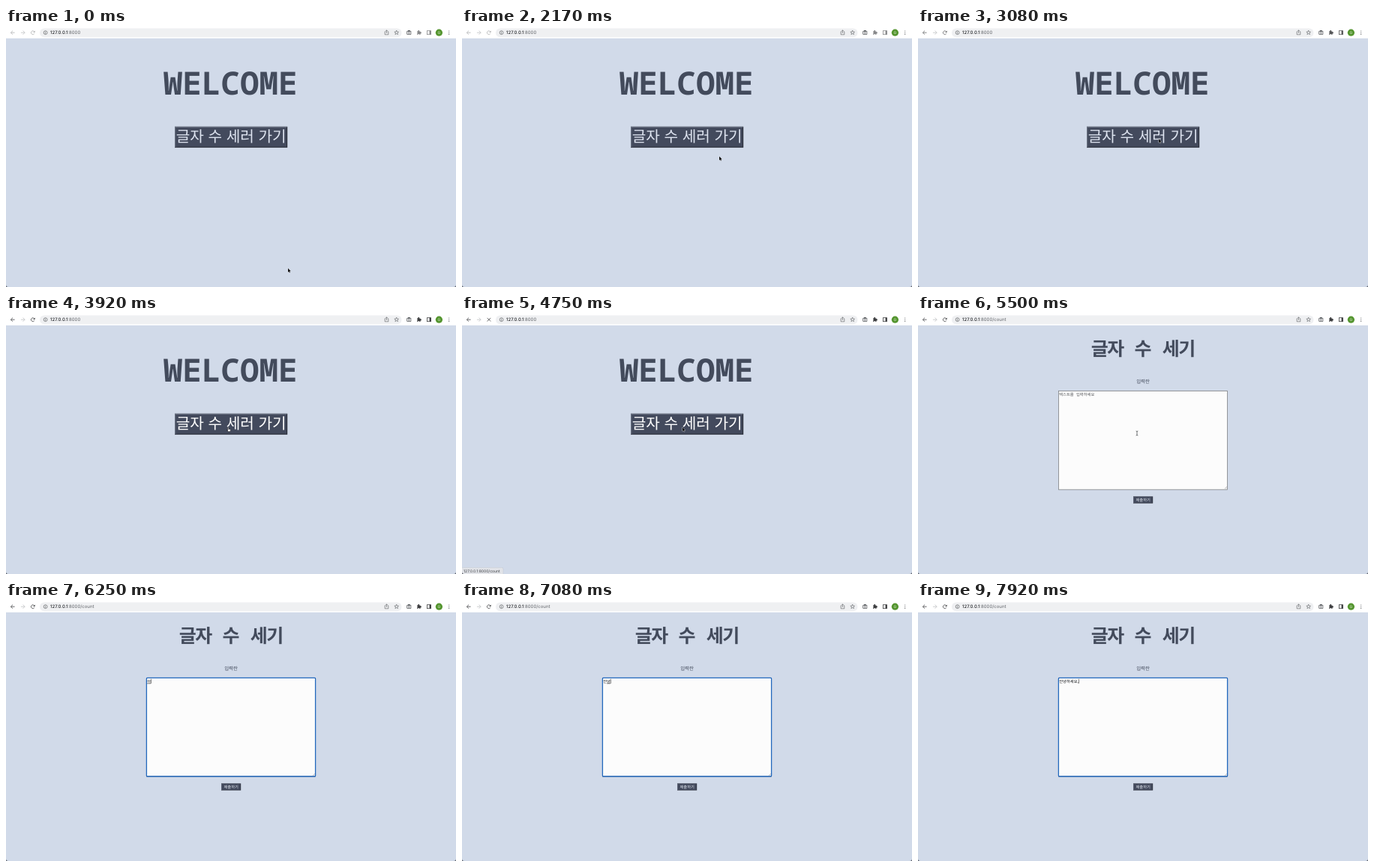
Recreate the animation shown at these times as an HTML page with a canvas. Size 600x346 px, loop 8 s.

```html
<!DOCTYPE html>
<html lang="ko">
<head>
<meta charset="utf-8">
<title>글자 수 세기</title>
<style>
html, body { margin: 0; width: 100%; height: 100%; overflow: hidden; background: #d1dae9; }
canvas { display: block; width: 600px; height: 346px; }
</style>
</head>
<body>
<canvas id="stage"></canvas>
<script>
const W = 600, H = 346, LOOP = 8000, STEPS_PER_MS = 12 / 1000;
const canvas = document.getElementById('stage');
const ctx = canvas.getContext('2d');
const ratio = window.devicePixelRatio || 1;
canvas.width = W * ratio;
canvas.height = H * ratio;
// keep fractional glyph advances at small sizes
ctx.textRendering = 'geometricPrecision';

const KR = '"Noto Sans CJK KR", "Noto Sans CJK", sans-serif';
const UI = 'Inter, Roboto, sans-serif';
const MONO = '"Noto Sans Mono", monospace';
const PAGE = '#d1dae9', INK = '#434b5c', ICON = '#55585c';

// Moments on the 12-per-second clock
const AWAKE = 36, HOVER = 46, STATUS_IN = 50, PRESS = 54, LOADING = 57,
      COUNT_PAGE = 58, STATUS_OUT = 61, FOCUS = 67, TYPING = 71;

// step, x, y
const PATH = [
  [0, 376, 321], [21, 376, 321], [22, 358, 214], [23, 348, 180], [25, 348, 180],
  [26, 343, 171.5], [31, 318, 143], [35, 321, 148], [39, 321, 148], [40, 307, 137],
  [45, 307, 137], [46, 300, 147], [47, 297, 150], [53, 297, 150], [54, 294, 150],
  [58, 294, 150], [66, 292, 158]
];

// step, committed text, syllable being composed
const TYPED = [
  [71, '', 'ㅇ'], [74, '', '아'], [80, '', '안'], [83, '안', 'ㄴ'], [84, '안', '녀'],
  [85, '안', '녕'], [87, '안녕', 'ㅎ'], [88, '안녕', '하'], [89, '안녕하', 'ㅅ'],
  [90, '안녕하', '세'], [91, '안녕하세', 'ㅇ'], [92, '안녕하세', '요'], [95, '안녕하세요,', '']
];

const clamp = v => Math.max(0, Math.min(1, v));

function pathAt(step) {
  const i = PATH.findIndex(p => p[0] > step);
  if (i < 0) return PATH[PATH.length - 1].slice(1);
  const a = PATH[i - 1], b = PATH[i], u = (step - a[0]) / (b[0] - a[0]);
  return [a[1] + (b[1] - a[1]) * u, a[2] + (b[2] - a[2]) * u];
}

function text(str, x, y, font, color, align = 'left') {
  ctx.font = font;
  ctx.fillStyle = color;
  ctx.textAlign = align;
  ctx.fillText(str, x, y);
  return ctx.measureText(str).width;
}

function rect(x, y, w, h, color) {
  ctx.fillStyle = color;
  ctx.fillRect(x, y, w, h);
}

function pill(x, y, w, h, r, color) {
  ctx.beginPath();
  ctx.roundRect(x, y, w, h, r);
  ctx.fillStyle = color;
  ctx.fill();
}

function poly(points, close) {
  ctx.beginPath();
  points.forEach(([x, y], i) => i ? ctx.lineTo(x, y) : ctx.moveTo(x, y));
  if (close) ctx.closePath();
}

function line(points, color, width = 0.8, close = false) {
  poly(points, close);
  ctx.strokeStyle = color;
  ctx.lineWidth = width;
  ctx.stroke();
}

function arc(x, y, r, color, width = 0.8, from = 0, to = Math.PI * 2) {
  ctx.beginPath();
  ctx.arc(x, y, r, from, to);
  ctx.strokeStyle = color;
  ctx.lineWidth = width;
  ctx.stroke();
}

function dot(x, y, r, color) {
  ctx.beginPath();
  ctx.arc(x, y, r, 0, Math.PI * 2);
  ctx.fillStyle = color;
  ctx.fill();
}

function navArrow(x, dir, color) {
  line([[x - 2.6 * dir, 6.2], [x + 2.6 * dir, 6.2]], color);
  line([[x, 3.6], [x + 2.6 * dir, 6.2], [x, 8.8]], color);
}

function mixGray(from, to, u) {
  const v = Math.round(from + (to - from) * u);
  return `rgb(${v},${v + 1},${v + 3})`;
}

function toolbar(step) {
  const awake = clamp((step - AWAKE + 1) / 3);
  const tone = mixGray(176, 70, awake);
  rect(0, 0, W, 13.8, '#fff');
  pill(45, 0.6, 482.5, 11.6, 5.8, '#eff0f2');

  navArrow(9, -1, tone);
  navArrow(22.5, 1, '#c0c2c5');
  if (step === LOADING) {
    line([[33.6, 3.9], [38.2, 8.5]], tone);
    line([[38.2, 3.9], [33.6, 8.5]], tone);
  } else {
    arc(35.8, 6.2, 2.4, tone, 0.8, 0.5, 5.5);
    poly([[38.6, 3.4], [38.6, 5.9], [36.1, 5.9]], true);
    ctx.fillStyle = tone;
    ctx.fill();
  }

  arc(52.6, 6.2, 2.4, ICON, 0.65);
  rect(52.25, 5.8, 0.7, 1.8, ICON);
  rect(52.25, 4.6, 0.7, 0.7, ICON);
  const w = text('127.0.0.1', 59, 8.4, `500 6px ${UI}`, '#25272b');
  text(step < COUNT_PAGE ? ':8000' : ':8000/count', 59 + w, 8.4, `6px ${UI}`, '#606368');

  // share
  line([[506.2, 4.8], [505.2, 4.8], [505.2, 8.8], [509.8, 8.8], [509.8, 4.8], [508.8, 4.8]], ICON, 0.6);
  line([[507.5, 7], [507.5, 3]], ICON, 0.6);
  line([[506.2, 4.1], [507.5, 2.8], [508.8, 4.1]], ICON, 0.6);

  // star
  const star = Array.from({ length: 10 }, (_, i) => {
    const r = i % 2 ? 1.3 : 3, a = i * Math.PI / 5 - Math.PI / 2;
    return [520.7 + r * Math.cos(a), 6.2 + r * Math.sin(a)];
  });
  line(star, ICON, 0.6, true);

  // camera
  pill(534.3, 4, 6, 4.9, 0.8, ICON);
  pill(535.8, 3.1, 3, 2, 0.5, ICON);
  pill(535, 4.7, 4.6, 3.5, 0.4, '#fff');
  arc(537.3, 6.4, 1.1, ICON, 0.7);

  // extensions
  const ext = mixGray(135, 60, awake);
  pill(548, 4.4, 4.6, 4.4, 0.5, ext);
  dot(550.2, 4.1, 1.1, ext);
  dot(552.8, 6.4, 1.1, ext);
  dot(548.1, 6.6, 0.8, '#fff');
  dot(550.2, 8.8, 0.8, '#fff');

  // side panel
  ctx.strokeStyle = ext;
  ctx.lineWidth = 0.8;
  ctx.strokeRect(561.5, 3.7, 5, 5);
  rect(564.6, 3.7, 2, 5, ext);

  dot(577.4, 6.2, 4.6, '#54952f');
  text('G', 577.4, 8, `4.8px ${UI}`, '#eaf3e4', 'center');
  for (const y of [4, 6.2, 8.4]) dot(590.7, y, 0.55, ICON);
}

function button(x, y, w, h, edge, pressed) {
  const light = '#686f80', dark = '#2b2f3b';
  rect(x, y, w, h, pressed ? light : dark);
  poly([[x, y], [x + w, y], [x + w - edge, y + edge], [x + edge, y + h - edge], [x, y + h]], true);
  ctx.fillStyle = pressed ? dark : light;
  ctx.fill();
  rect(x + edge, y + edge, w - 2 * edge, h - 2 * edge, '#434a5d');
}

function welcomePage(step) {
  text('WELCOME', 299.1, 89.4, `700 42.6px ${MONO}`, INK, 'center');
  button(225, 131.8, 150.2, 28, 1.2, step === PRESS);
  const hover = clamp((step - HOVER + 1) / 2);
  const c = Math.round(222 + 33 * hover);
  text('글자 수 세러 가기', 300.2, 152.2, `20.2px ${KR}`,
    `rgb(${c},${Math.min(255, c + 6)},${Math.min(255, c + 18)})`, 'center');
}

function typed(step) {
  const font = `500 5.3px ${KR}`;
  const [, done, open] = TYPED.filter(s => s[0] <= step).pop();
  const x = 188.2;
  const a = text(done, x, 107.6, font, '#16181b');
  const b = text(open, x + a, 107.6, font, '#16181b');
  if (open) rect(x + a, 108.6, b, 0.6, '#16181b');
  rect(x + a + b, 102.8, 0.6, 6, '#333');
}

function countPage(step) {
  const title = `700 25px ${KR}`;
  ctx.letterSpacing = '-1.6px';
  text('글자', 230.8, 54.4, title, INK);
  text('수', 288.6, 54.4, title, INK);
  text('세기', 325.8, 54.4, title, INK);
  ctx.letterSpacing = '0px';
  text('입력란', 300, 91.4, `6.4px ${KR}`, INK, 'center');

  const focus = clamp((step - FOCUS + 1) / 2);
  rect(187.4, 101.4, 225.2, 131.8, '#fcfcfc');
  ctx.strokeStyle = '#7d8084';
  ctx.lineWidth = 0.8;
  ctx.strokeRect(187.4, 101.4, 225.2, 131.8);
  if (focus) {
    ctx.globalAlpha = focus;
    ctx.beginPath();
    ctx.roundRect(187.4, 101.4, 225.2, 131.6, 1);
    ctx.strokeStyle = '#2368bd';
    ctx.lineWidth = 1.3;
    ctx.stroke();
    ctx.globalAlpha = 1;
  }
  line([[408.8, 232.2], [411.8, 229.2]], '#8b8d90', 0.5);
  line([[410.4, 232.2], [411.8, 230.8]], '#8b8d90', 0.5);

  if (step < TYPING) {
    const font = `5.3px ${KR}`;
    text('텍스트를', 188.2, 107.6, font, '#55575a');
    text('입력하세요', 211, 107.6, font, '#55575a');
  } else {
    typed(step);
  }

  button(287, 242.4, 26.2, 9.2, 0.7, false);
  text('제출하기', 300.2, 248.8, `5.3px ${KR}`, '#e8edf6', 'center');
}

function status(step) {
  const alpha = clamp((step - STATUS_IN + 1) / 2) * clamp((STATUS_OUT + 2 - step) / 3);
  if (!alpha) return;
  ctx.globalAlpha = alpha;
  pill(-2, 337.2, 57.2, 11, 2, '#bcc3d0');
  pill(-2, 337.6, 56.8, 11, 2, '#e1e3e8');
  text('127.0.0.1:8000/count', 2, 343.8, `5.05px ${UI}`, '#3f4246');
  ctx.globalAlpha = 1;
}

function shape(points) {
  poly(points, true);
  ctx.lineJoin = 'round';
  ctx.strokeStyle = '#e4e8ef';
  ctx.lineWidth = 0.8;
  ctx.stroke();
  ctx.fillStyle = '#111';
  ctx.fill();
  ctx.lineJoin = 'miter';
}

function hand() {
  pill(-1.4, 0, 1.4, 4, 0.6, '#fff');
  ctx.strokeStyle = '#16181f';
  ctx.lineWidth = 0.6;
  ctx.stroke();
  pill(-1.6, 2.4, 4, 3.4, 1, '#fff');
  ctx.stroke();
  line([[-1.4, 4.8], [-2.6, 3.2]], '#16181f', 0.7);
}

function pointer(step) {
  if (step >= TYPING) return;
  const [x, y] = pathAt(step);
  ctx.save();
  ctx.translate(x, y);
  if (step >= COUNT_PAGE) {
    line([[0, -2.8], [0, 2.8]], '#33363a', 0.7);
    for (const s of [-1, 1]) line([[-1.4, 3 * s], [0, 2.5 * s], [1.4, 3 * s]], '#33363a', 0.6);
  } else if (step > HOVER && step < LOADING) {
    hand();
  } else {
    shape([[0, 0], [0, 5.2], [1.2, 4.2], [2, 6], [2.9, 5.6], [2.1, 3.9], [3.7, 3.8]]);
  }
  ctx.restore();
}

function corners() {
  for (const [x, s] of [[0, 1], [W, -1]]) {
    ctx.beginPath();
    ctx.moveTo(x, H - 3);
    ctx.quadraticCurveTo(x, H, x + 3 * s, H);
    ctx.lineTo(x, H);
    ctx.fillStyle = '#4a4e57';
    ctx.fill();
  }
}

function draw(now) {
  const step = Math.floor((now % LOOP) * STEPS_PER_MS + 0.05);
  ctx.setTransform(ratio, 0, 0, ratio, 0, 0);
  rect(0, 0, W, H, PAGE);
  toolbar(step);
  (step < COUNT_PAGE ? welcomePage : countPage)(step);
  status(step);
  corners();
  pointer(step);
}

const start = performance.now();
function tick() {
  draw(performance.now() - start);
  requestAnimationFrame(tick);
}
tick();
</script>
</body>
</html>
```
